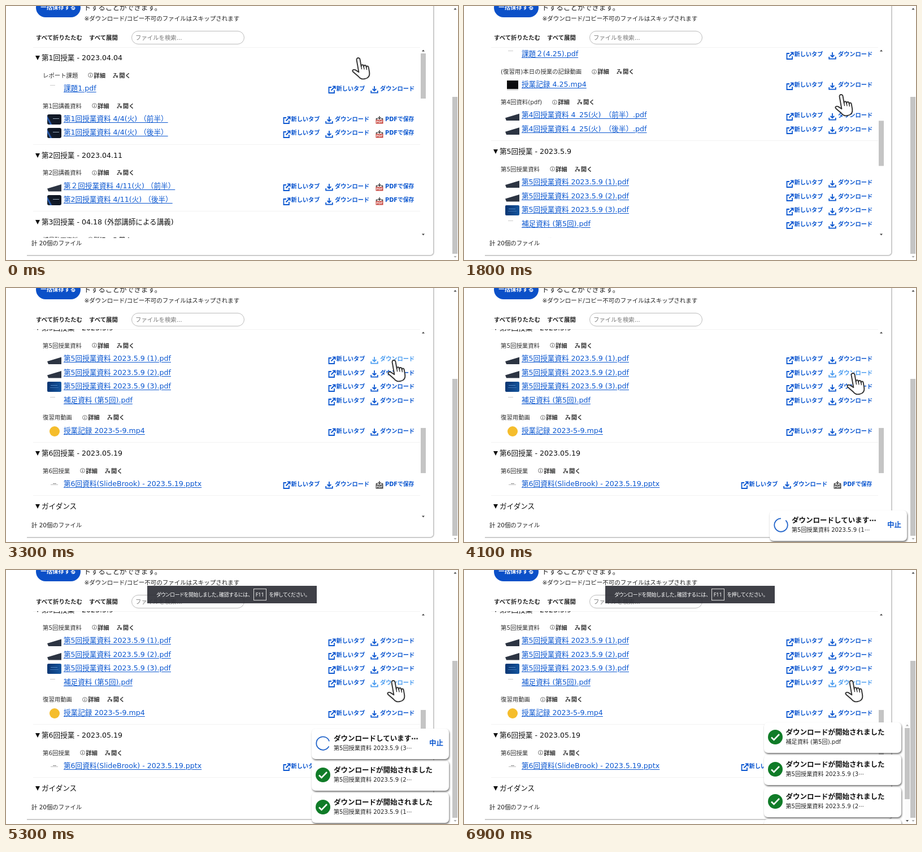
An HTML page that plays this animation: 800 px wide and 450 px high, repeating every 7000 ms.

```html
<!DOCTYPE html>
<html lang="ja">
<head>
<meta charset="utf-8">
<title>授業資料</title>
<style>
html, body { margin: 0; width: 100%; height: 100%; overflow: hidden; background: #fff; }
#stage { position: relative; width: 800px; height: 450px; overflow: hidden; background: #fff; color: #222;
  font: 10.4px "DejaVu Sans", "Noto Sans CJK JP", "Noto Sans CJK", sans-serif; white-space: pre; }
#stage > *, .row, .row > *, .toast, .toast > * { position: absolute; }
.t { line-height: 20px; margin-top: -10px; }
.card { left: 30px; top: -20px; width: 726px; height: 461px; border: solid #ccc; border-width: 0 2px 2px 0;
  border-radius: 0 0 7px 0; }
.card::after { content: ""; position: absolute; left: 0; bottom: -2px; width: 7px; height: 3px; background: #fff; }
.save { left: 53px; top: -14px; width: 79px; height: 34px; border-radius: 17px; background: #0b50c8; color: #fff;
  font-weight: bold; line-height: 33px; text-align: center; }
.find { left: 222px; top: 44px; width: 192px; height: 22px; padding-left: 6px; border: 1px solid #bbb;
  border-radius: 12px; line-height: 22px; color: #777; }
#view { left: 0; top: 73px; width: 734px; height: 338px; overflow: hidden; }
#list { position: absolute; left: 0; top: -73px; }
.row { left: 0; width: 760px; height: 20px; margin-top: -10px; line-height: 20px; }
.row svg { fill: none; }
.rule { left: 48px; width: 685px; height: 1px; background: #f3f3f3; top: -10px; }
.head { left: 63px; font-size: 12.6px; color: #111; }
.mark { left: 52px; top: 6px; border: solid transparent; border-width: 8.5px 4.75px 0; border-top-color: #111; }
.sub { left: 65px; display: flex; align-items: center; height: 20px; color: #333; }
.sub .info { margin: 0 1px 0 18px; }
.sub .user { margin: 0 1px 0 13px; }
.link { left: 102px; font-size: 12.6px; color: #0b57d0; text-decoration: underline; text-underline-offset: 2px; }
.act { top: 1px; color: #0b57d0; font-weight: bold; font-size: 10.2px; height: 20px; }
.act i { font-style: normal; }
.act svg { position: absolute; left: 0; top: 4.5px; }
.act span { position: absolute; left: 14.5px; }
.act.down span { left: 17px; }
.act.pdf span { left: 17px; font-size: 9.8px; }
.act.hot { color: #4a9cf0; }
.thumb { left: 73px; top: 2px; width: 25px; height: 18px; }
.night { border-radius: 3px; background: linear-gradient(#9ab 0 0) 10px 7px / 11px 1px no-repeat,
  linear-gradient(62deg, #16222f 12%, #2f6bd0 19%, #131c2b 27%, #0d141f); }
.wedge { background: #2c3442; clip-path: polygon(0 72%, 100% 30%, 100% 100%, 8% 100%); }
.page { background: linear-gradient(#ccc 0 0) 5px 2px / 9px 1px no-repeat; }
.movie { background: linear-gradient(#0b0b0d 0 0) 3px 1px / 20px 15px no-repeat, linear-gradient(#aaa 0 0) 3px 17px / 20px 1px no-repeat; }
.sea { border-radius: 2px; background: linear-gradient(#4f86c4 0 0) 6px 6px / 12px 1px no-repeat,
  linear-gradient(#3c73b4 0 0) 5px 10px / 15px 1px no-repeat, linear-gradient(100deg, #0b3470, #14569f); }
.disk { left: 77px; width: 18px; border-radius: 50%; background: #f5bd2c; }
.slide { background: linear-gradient(#888 0 0) 10px 7px / 6px 1px no-repeat, linear-gradient(#bbb 0 0) 6px 9px / 13px 1px no-repeat; }
.banner { left: 250px; top: 28px; width: 300px; height: 31px; background: rgba(43, 44, 51, .9); color: #fff;
  display: flex; align-items: center; justify-content: center; font-size: 9px;
  font-feature-settings: "palt"; letter-spacing: -.01em; }
.banner b { border: 1px solid #ddd; width: 21px; height: 19px; margin: 0 5px; text-align: center;
  font: 9px/19px "Noto Sans", sans-serif; letter-spacing: 0; }
#toasts { left: 0; top: 0; }
.toast { width: 243px; height: 54px; border-radius: 7px; background: #fff; box-shadow: 1px 2px 3px rgba(0, 0, 0, .55); }
.toast .title { left: 39px; top: 8px; font-size: 12.5px; font-weight: bold; line-height: 20px; color: #111; }
.toast .file { left: 39px; top: 25px; font-size: 10.1px; line-height: 20px; }
.toast .stop { left: 208px; top: 16px; font-size: 12.5px; line-height: 20px; font-weight: bold; color: #0b57d0; }
.toast svg { left: 6px; top: 12px; }
#bars { left: 0; top: 0; }
</style>
</head>
<body>
<svg width="0" height="0" style="position:absolute">
  <symbol id="tab" viewBox="0 0 14 14"><path d="M6 3H1.5V13H11V8M8 1.3h4.7V6M12.5 1.5L5.5 8.5" stroke="currentColor" stroke-width="1.8"/></symbol>
  <symbol id="down" viewBox="0 0 14 14"><path d="M7 1v8M3.7 6L7 9.3 10.3 6M1.2 9v3.6h11.6V9" stroke="currentColor" stroke-width="1.8"/></symbol>
  <symbol id="pdf" viewBox="0 0 14 14"><path d="M7 0v4M4.5 2.5L7 5l2.5-2.5M1.5 7V4.5H4M12.5 7V4.5H10" stroke="#444" stroke-width="1.5"/>
    <path d="M.5 6.5h13v7H.5z" fill="currentColor"/><text x="7" y="12.2" text-anchor="middle" font-size="5.2" fill="#fff">PDF</text></symbol>
  <symbol id="info" viewBox="0 0 9 9"><circle cx="4.5" cy="4.5" r="3.9" stroke="#555" stroke-width=".8"/><path d="M4.5 2v1M4.5 3.8V7" stroke="#555"/></symbol>
  <symbol id="user" viewBox="0 0 10 10"><path d="M1.5 1.5h4L1 8.5h2.5M4 5l2 1" stroke="#333" stroke-width="1.2"/><path d="M6 5h3v4H6z" fill="#666"/></symbol>
</svg>
<div id="stage">
  <div class="card"></div>
  <div class="save">一括保存する</div>
  <div class="t" style="left:138px;top:3px;font-size:12.6px">ドすることができます。</div>
  <div class="t" style="left:138.5px;top:22px;font-size:10.5px">※ダウンロード/コピー不可のファイルはスキップされます</div>
  <b class="t" style="left:53px;top:56px">すべて折りたたむ</b>
  <b class="t" style="left:147px;top:56px">すべて展開</b>
  <div class="find">ファイルを検索...</div>
  <div class="rule" style="top:73px"></div>
  <div id="view"><div id="list"></div></div>
  <div class="t" style="left:45px;top:420px">計 20個のファイル</div>
  <svg id="bars" width="800" height="450" fill="#c4c4c4">
    <rect id="thumb" x="734" width="9" height="80"/>
    <rect x="790" y="161" width="9" height="278"/>
    <path d="M736 80.500h5l-2.500-3zM736 403.500h5l-2.500 3zM792.500 6.500h5l-2.500-3z" fill="#444"/>
    <path d="M792.500 443h5l-2.500 3z" fill="#aaa"/>
  </svg>
  <div id="toasts"></div>
  <svg id="more" style="left:780px;top:270px" width="9" height="180">
    <path d="M0 0h9v180H0z" fill="#fcfcfc"/><path d="M0 10h9v126H0z" fill="#c4c4c4"/>
    <path d="M2 6.500h5l-2.500-3z" fill="#aaa"/><path d="M2 173h5l-2.500 3z" fill="#444"/>
  </svg>
  <div class="banner" id="banner"><span>ダウンロードを開始しました。確認するには、</span><b>F11</b><span>を押してください。</span></div>
  <svg id="hand" width="60" height="60" style="left:-1.5px;top:0;overflow:visible">
    <g transform="rotate(-10)" stroke="#333" fill="#fff">
      <path d="M-3 3a3 3 0 0 1 6 0V16c0-3.500 4.300-3.500 4.300 0V17.500c0-3.500 4.300-3.500 4.300 0V19.500c0-3.300 3.900-3 3.900 0V28c0 7-4 10.500-9.500 10.500H4c-4 0-6.500-2-8.500-5.500L-13 22.500c-1.500-3 1.800-4.500 4.500-2.500L-3 25z"
        stroke-width="1.900" stroke-linejoin="round"/>
      <path d="M3 15v6M7.300 17v5M11.600 18.500v5" stroke-width="1.400"/>
    </g>
  </svg>
</div>
<script>
const LOOP = 7000, STEP = 100;
const $ = id => document.getElementById(id);

// h: heading, s: group, f: file (name, thumbnail, colour of the PDF button)
const rows = [
  ["h", "第1回授業 - 2023.04.04"],
  ["s", "レポート課題"], ["f", "課題1.pdf", "page"],
  ["s", "第1回講義資料"],
  ["f", "第1回授業資料 4/4(火) （前半）", "night", "#c8473f"],
  ["f", "第1回授業資料 4/4(火) （後半）", "night", "#c8473f"],
  ["h", "第2回授業 - 2023.04.11"],
  ["s", "第2回講義資料"],
  ["f", "第２回授業資料 4/11(火) （前半）", "wedge", "#c8473f"],
  ["f", "第2回授業資料 4/11(火) （後半）", "night", "#c8473f"],
  ["h", "第3回授業 - 04.18 (外部講師による講義)"],
  ["s", "補足動画資料"], ["f", "Movie.mp4", "disk"],
  ["s", "授業資料"], ["f", "第3回(外部講師) 2023-04-18.pdf", "sea"],
  ["h", "第4回授業 - 2023.04.25"],
  ["s", "レポート課題 - 5.12まで"], ["f", "課題２(4.25).pdf", "page"],
  ["s", "(復習用)本日の授業の記録動画"], ["f", "授業記録 4.25.mp4", "movie"],
  ["s", "第4回資料(pdf)"],
  ["f", "第4回授業資料 4_25(火)_（前半）.pdf", "wedge"],
  ["f", "第4回授業資料 4_25(火)_（後半）.pdf", "wedge"],
  ["h", "第5回授業 - 2023.5.9"],
  ["s", "第5回授業資料"],
  ["f", "第5回授業資料 2023.5.9 (1).pdf", "wedge"],
  ["f", "第5回授業資料 2023.5.9 (2).pdf", "wedge"],
  ["f", "第5回授業資料 2023.5.9 (3).pdf", "sea"],
  ["f", "補足資料 (第5回).pdf", "page"],
  ["s", "復習用動画"], ["f", "授業記録 2023-5-9.mp4", "disk"],
  ["h", "第6回授業 - 2023.05.19"],
  ["s", "第6回授業"], ["f", "第6回資料(SlideBrook) - 2023.5.19.pptx", "slide", "#444"],
  ["h", "ガイダンス"],
];
const gap = { hs: 30.5, sf: 23.3, ff: 24.5, fs: 30.7, fh: 40.4 };

const icon = (name, size) => `<svg class="${name}" width="${size}" height="${size}"><use href="#${name}"/></svg>`;
const action = (kind, x, label, color) =>
  `<div class="act ${kind}" style="left:${x}px">${color ? `<i style="color:${color}">${icon(kind, 14)}</i>` : icon(kind, 14)}<span>${label}</span></div>`;

const draw = {
  h: text => `<div class="rule"></div><div class="mark"></div><div class="head">${text}</div>`,
  s: text => `<div class="sub">${text}${icon("info", 9)}<b>詳細</b>${icon("user", 10)}<b>開く</b></div>`,
  f: (text, thumb, pdf) => {
    const dx = pdf ? -80 : 0;
    return `<div class="thumb ${thumb}"></div><div class="link">${text}</div>` +
      action("tab", 570 + dx, "新しいタブ") + action("down", 645 + dx, "ダウンロード") +
      (pdf ? action("pdf", 654, "PDFで保存", pdf) : "");
  },
};

const buttons = [];
let y = 92, last = "";
for (const [kind, ...args] of rows) {
  y += gap[last + kind] || 0;
  last = kind;
  const el = document.createElement("div");
  el.className = "row";
  el.style.top = y + "px";
  el.innerHTML = draw[kind](...args);
  $("list").append(el);
  if (kind === "f") buttons.push({ el: el.querySelector(".down"), x: args[2] ? 565 : 645, y: y + 1 });
}

// [name, shown at, done at]
const toasts = [
  ["第5回授業資料 2023.5.9 (1⋯", 3700, 4500],
  ["第5回授業資料 2023.5.9 (2⋯", 4300, 5000],
  ["第5回授業資料 2023.5.9 (3⋯", 4900, 5700],
  ["補足資料 (第5回).pdf", 5500, 6500],
].map(([file, on, done]) => {
  const el = document.createElement("div");
  el.className = "toast";
  el.innerHTML = `<svg width="28" height="28" viewBox="-14 -14 28 28" fill="none">
    <path class="spin" d="M8.300-8.300A11.700 11.700 0 1 1 0-11.700" stroke="#1f62c9" stroke-width="1.800"/>
    <g class="ok"><circle r="13" fill="#107c28"/><path d="M-7 .5l4.500 4.500L7-5" stroke="#fff" stroke-width="2.600"/></g></svg>
    <div class="title"></div><div class="file">${file}</div><div class="stop">中止</div>`;
  $("toasts").append(el);
  const part = name => el.querySelector("." + name);
  return { el, on, done, spin: part("spin"), ok: part("ok"), title: part("title"), stop: part("stop") };
});

const scrollPath = [[430, 0], [1100, 245], [1800, 500], [2320, 687]];
const handPath = [[0, 624, 92], [450, 668, 157], [2400, 668, 157], [3100, 687, 128], [3600, 687, 128],
  [3900, 689, 151], [4300, 689, 151], [4600, 688, 175], [4900, 688, 175], [5200, 686, 196]];
const smooth = p => p * p * (3 - 2 * p);

function along(path, t, ease = p => p) {
  const i = path.findIndex(k => k[0] > t);
  if (i === 0) return path[0].slice(1);
  if (i < 0) return path[path.length - 1].slice(1);
  const a = path[i - 1], b = path[i], p = ease((t - a[0]) / (b[0] - a[0]));
  return a.slice(1).map((v, k) => v + (b[k + 1] - v) * p);
}

const show = (el, on) => { el.style.display = on ? "" : "none"; };

function render(t) {
  const [scroll] = along(scrollPath, t);
  const [hx, hy] = along(handPath, t, smooth);
  $("list").style.transform = `translateY(${-scroll}px)`;
  $("thumb").setAttribute("y", 84 + scroll / 4.19);
  $("hand").style.transform = `translate(${hx}px, ${hy}px)`;
  for (const b of buttons)
    b.el.classList.toggle("hot", Math.abs(b.y - scroll - hy) < 9 && hx > b.x && hx < b.x + 78);

  const full = t >= toasts[3].on;
  toasts.forEach((o, i) => {
    const done = t >= o.done;
    show(o.el, t >= o.on);
    o.el.style.left = (full ? 530.5 : 541) + "px";
    o.el.style.top = (full ? 440.5 : 394) - 56.7 * i + "px";
    o.title.textContent = done ? "ダウンロードが開始されました" : "ダウンロードしています⋯";
    show(o.stop, !done);
    show(o.ok, done);
    show(o.spin, !done);
    o.spin.setAttribute("transform", `rotate(${(t - 4100) * 0.36 % 360})`);
  });
  show($("more"), full);
  show($("banner"), t >= 4500);
}

const start = performance.now();
function tick() {
  const t = (performance.now() - start) % LOOP;
  render(Math.floor(t / STEP) * STEP);
  requestAnimationFrame(tick);
}
tick();
</script>
</body>
</html>
```
